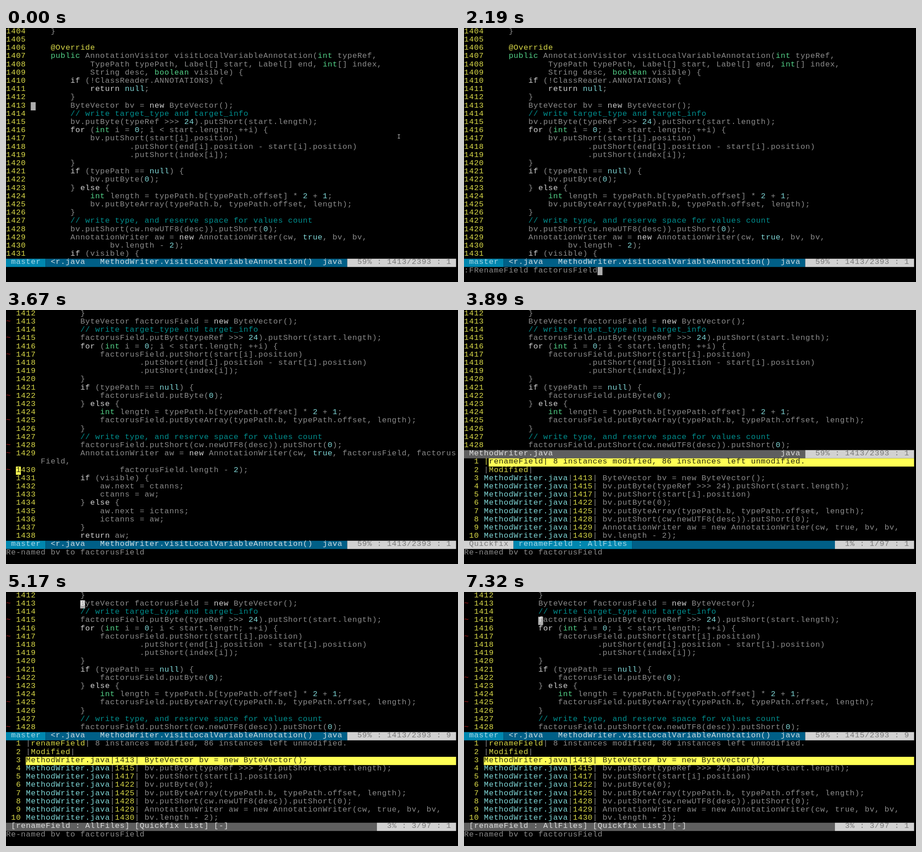
An HTML page with a canvas that plays this animation: 998x561 px, repeating every 9920 ms.

```html
<!DOCTYPE html>
<html lang="en">
<head>
<meta charset="utf-8">
<title>Renaming a field in a terminal editor</title>
<style>
html, body { margin: 0; height: 100%; overflow: hidden; background: #000; }
canvas { display: block; }
</style>
</head>
<body>
<canvas id="stage" width="998" height="561"></canvas>
<script>
const ctx = document.getElementById("stage").getContext("2d");
const LOOP = 9920, COLS = 91, ROWS = 30, CELL_W = 10.92, CELL_H = 18.2, BASELINE = 11.8;
const BLACK = "#000", GREY = "#a3a3a3", YELLOW = "#ffff55", CYAN = "#96ffff", GREEN = "#62f7a0",
      TEAL = "#00a8a8", RED = "#c42020", WHITE = "#f4f4f4", CURSOR = "#adadad",
      BLUE = "#0087af", NAVY = "#005f87", LIGHT = "#d2d2d2", DIM = "#686868", SLATE = "#5f5f5f";

const FIRST = 1404;
const code = `    }

    @Override
    public AnnotationVisitor visitLocalVariableAnnotation(int typeRef,
            TypePath typePath, Label[] start, Label[] end, int[] index,
            String desc, boolean visible) {
        if (!ClassReader.ANNOTATIONS) {
            return null;
        }
        ByteVector bv = new ByteVector();
        // write target_type and target_info
        bv.putByte(typeRef >>> 24).putShort(start.length);
        for (int i = 0; i < start.length; ++i) {
            bv.putShort(start[i].position)
                    .putShort(end[i].position - start[i].position)
                    .putShort(index[i]);
        }
        if (typePath == null) {
            bv.putByte(0);
        } else {
            int length = typePath.b[typePath.offset] * 2 + 1;
            bv.putByteArray(typePath.b, typePath.offset, length);
        }
        // write type, and reserve space for values count
        bv.putShort(cw.newUTF8(desc)).putShort(0);
        AnnotationWriter aw = new AnnotationWriter(cw, true, bv, bv,
                bv.length - 2);
        if (visible) {
            aw.next = ctanns;
            ctanns = aw;
        } else {
            aw.next = ictanns;
            ictanns = aw;
        }
        return aw;`.split("\n");
const usesField = line => /\bbv\b/.test(line);

let cells;

function put(row, col, text, fg = GREY, bg = BLACK) {
  for (const ch of text) cells[row][col++] = { ch, fg, bg };
  return col;
}

function colorOf(token) {
  if (token.startsWith("//")) return TEAL;
  if (token[0] === "@") return YELLOW;
  if (/^(public|int|boolean)$/.test(token)) return GREEN;
  if (/^(if|else|for|new|return)$/.test(token)) return WHITE;
  if (/^(null|true|\d+)$/.test(token)) return CYAN;
  return GREY;
}

function drawCode(first, rows, renamed, signs) {
  const left = signs ? 2 : 0;
  for (let row = 0, n = first; row < rows; row++, n++) {
    const line = code[n - FIRST];
    const text = renamed ? line.replace(/\bbv\b/g, "factorusField") : line;
    if (signs && usesField(line)) put(row, 0, "~", RED);
    put(row, left, String(n), YELLOW);
    let col = left + 5;
    for (const token of text.match(/\/\/.*|@?\w+|./g) || []) {
      for (const ch of token) {
        if (col === COLS) { row++; col = left + 5; }
        col = put(row, col, ch, colorOf(token));
      }
    }
  }
}

// Status bar: segments from the left, a light block at the right end.
function drawBar(row, fill, position, ...segments) {
  put(row, 0, " ".repeat(COLS), WHITE, fill);
  let col = 0;
  for (const [text, fg, bg] of segments) col = put(row, col, text, fg, bg);
  const end = `  ${position} `;
  put(row, COLS - end.length, end, DIM, LIGHT);
}

function drawActiveBar(row, position) {
  drawBar(row, NAVY, "59% : " + position, [" master ", "#c4e6f2", BLUE],
    [" <r.java   MethodWriter.visitLocalVariableAnnotation()  java", WHITE, NAVY]);
}

function drawQuickfix(selected) {
  const changed = code.map((line, i) => [i + FIRST, line.trim()]).filter(([, line]) => usesField(line));
  for (let i = 0; i < 10; i++) {
    const row = 18 + i;
    put(row, 0, String(i + 1).padStart(3), YELLOW);
    let parts;
    if (i === 0) parts = [["|"], ["renameField", YELLOW], ["| 8 instances modified, 86 instances left unmodified."]];
    else if (i === 1) parts = [["|"], ["Modified", YELLOW], ["|"]];
    else {
      const [n, line] = changed[i - 2];
      parts = [["MethodWriter.java", CYAN], ["|"], [String(n), YELLOW], ["| " + line]];
    }
    let col = 4;
    for (const [text, fg] of parts) col = put(row, col, text, fg);
    if (i === selected)
      for (let c = 4; c < COLS; c++) put(row, c, cells[row][c].ch, BLACK, YELLOW);
  }
}

// Coloured cells are inverted, plain ones get the grey block.
function drawCursor(row, col) {
  const { ch, fg, bg } = cells[row][col];
  if (fg === GREY) put(row, col, ch, "#fff", CURSOR);
  else put(row, col, ch, bg, fg);
}

function typing(text, cursor = text.length) {
  drawCode(1404, 28, false, false);
  drawActiveBar(28, "1413/2393 : 1");
  put(29, 0, text);
  if (cursor >= 0) drawCursor(29, cursor);
}

function idle() {
  typing("", -1);
  drawCursor(9, 5);
}

function renamed() {
  drawCode(1412, 28, true, true);
  drawActiveBar(28, "1413/2393 : 1");
  drawCursor(19, 2);
}

function inList(line) {
  drawCode(1412, 17, true, false);
  drawBar(17, SLATE, "59% : 1413/2393 : 1", [" MethodWriter.java".padEnd(64) + "java", WHITE, SLATE]);
  drawQuickfix(0);
  drawBar(28, NAVY, `${line}% : ${line}/97 : 1`, [" Quickfix ", DIM, LIGHT],
    [" renameField : AllFiles ", "#c4e6f2", BLUE]);
  drawCursor(17 + line, 4);
}

function inCode(line) {
  drawCode(1412, 17, true, true);
  drawActiveBar(17, line + "/2393 : 9");
  drawQuickfix(2);
  drawBar(28, SLATE, "3% : 3/97 : 1", [" [renameField : AllFiles] [Quickfix List] [-]", WHITE, SLATE]);
  drawCursor(line - 1412, 15);
}

const command = ":FRenameField factorusField";
const steps = [
  [0, idle],
  [1110, () => typing(":")],
  [1470, () => typing(":F")],
  [1830, () => typing(":FR")],
  [2020, () => typing(":FRe")],
  [2190, () => typing(command)],
  [3260, () => typing(command, -1)],
  [3450, () => typing(command, 0)],
  [3670, renamed],
  [3890, () => inList(1)],
  [4580, () => inList(2)],
  [4830, () => inList(3)],
  [5170, () => inCode(1413)],
  [7060, () => inCode(1414)],
  [7320, () => inCode(1415)]
];

function drawPointer() {
  ctx.strokeStyle = "#c8c8c8";
  ctx.lineWidth = 1;
  ctx.beginPath();
  ctx.moveTo(865, 235.5); ctx.lineTo(870, 235.5);
  ctx.moveTo(867.5, 235); ctx.lineTo(867.5, 244);
  ctx.moveTo(865, 243.5); ctx.lineTo(870, 243.5);
  ctx.stroke();
}

function drawBackgrounds(line, row) {
  for (let from = 0, to; from < COLS; from = to) {
    const { bg } = line[from];
    for (to = from; to < COLS && line[to].bg === bg;) to++;
    ctx.fillStyle = bg;
    if (bg !== BLACK) ctx.fillRect(from * CELL_W, row * CELL_H, (to - from) * CELL_W, CELL_H);
  }
}

function drawText(line, row) {
  line.forEach(({ ch, fg }, col) => {
    ctx.fillStyle = fg;
    ctx.fillText(ch, (col + 0.5) * CELL_W, row * CELL_H + BASELINE);
  });
}

function paint(draw, time) {
  cells = Array.from({ length: ROWS }, () =>
    Array.from({ length: COLS }, () => ({ ch: " ", fg: GREY, bg: BLACK })));
  draw();
  if (time >= 3670) put(29, 0, "Re-named bv to factorusField");
  ctx.fillStyle = BLACK;
  ctx.fillRect(0, 0, 998, 561);
  cells.forEach(drawBackgrounds);
  ctx.font = '17px "Liberation Mono", "Courier New", monospace';
  ctx.textAlign = "center";
  ctx.globalAlpha = 0.85; // thin strokes
  cells.forEach(drawText);
  ctx.globalAlpha = 1;
  if (time < 1150) drawPointer();
}

let shown;
function tick() {
  const time = performance.now() % LOOP;
  const step = steps.findLastIndex(([start]) => time >= start);
  const key = step + (time < 1150 ? "p" : "");
  if (key !== shown) paint(steps[step][1], time);
  shown = key;
  requestAnimationFrame(tick);
}
tick();
</script>
</body>
</html>
```
